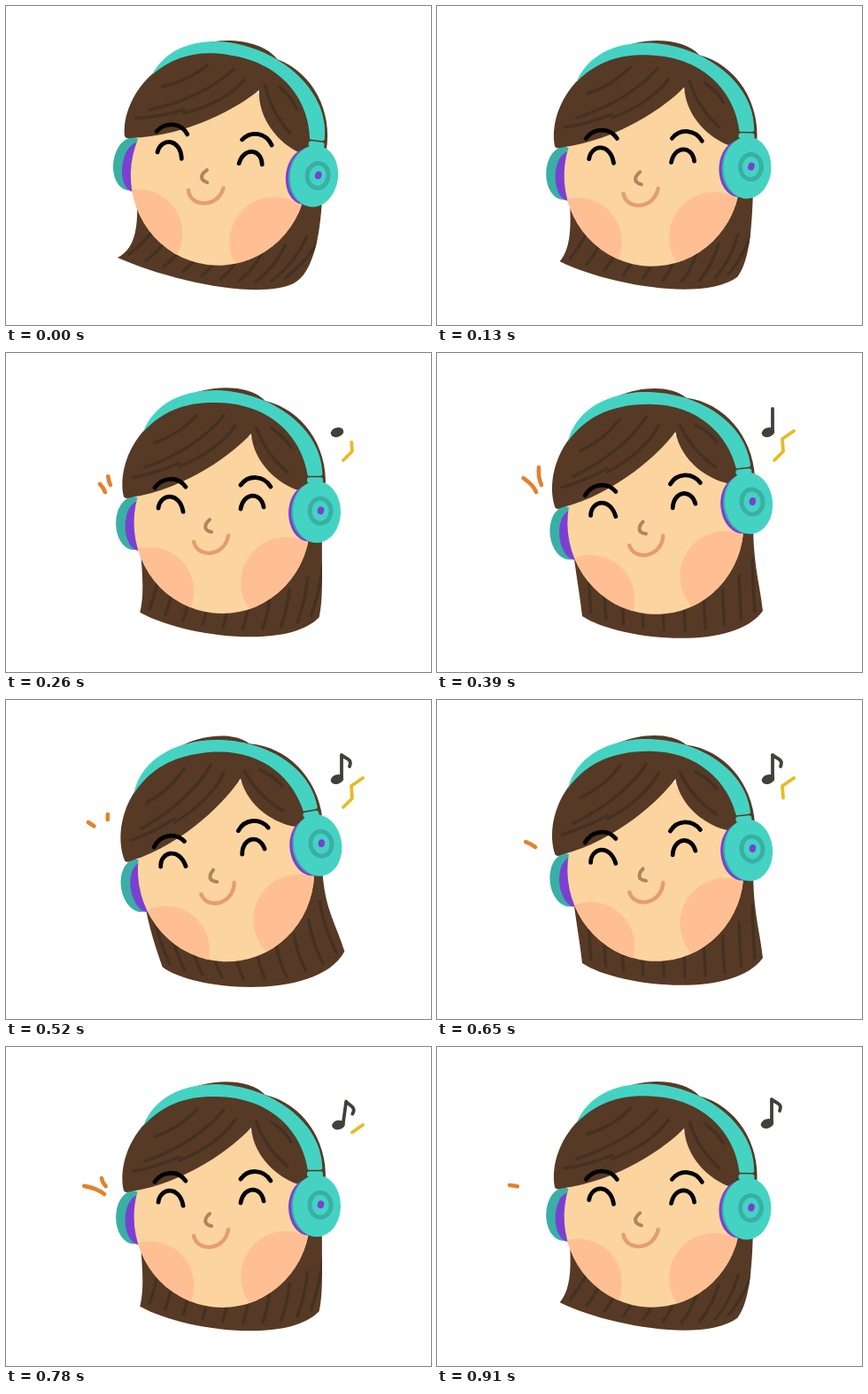
Animation of 480 by 360 pixels, one loop 1040 ms. Source, as an HTML page:

```html
<!DOCTYPE html>
<html lang="en">
<head>
<meta charset="utf-8">
<title>Listening to music</title>
<style>
  html, body { margin: 0; width: 100%; height: 100%; overflow: hidden; background: #fff; }
  svg { display: block; width: 100vw; height: 100vh; }
  .line { fill: none; stroke-linecap: round; stroke-linejoin: round; }
  .hair { fill: #563a25; }
  .strand { stroke: #433122; stroke-width: 3.5; }
  .ink { stroke: #000; stroke-width: 4.8; }
  .teal { fill: #44d3c3; }
  .deep { fill: #3aafa6; }
  .violet { fill: #7b40d2; }
  .cheek { fill: #ffbf93; }
  .spark { stroke: #e5812a; stroke-width: 4.6; }
  .zigzag { stroke: #e5bd22; stroke-width: 3.8; }
  #note { stroke: #41403a; stroke-width: 3.8; }
</style>
</head>
<body>
<svg viewBox="0 0 480 360">
  <defs>
    <clipPath id="faceClip"><ellipse cx="244" cy="191.5" rx="99.5" ry="102.5"/></clipPath>
    <clipPath id="backClip"><path class="backEdge"/></clipPath>
  </defs>

  <path class="hair backEdge"/>
  <path id="strands" class="line strand" clip-path="url(#backClip)"/>

  <g id="head">
    <ellipse class="deep" cx="144" cy="192" rx="20" ry="30"/>
    <ellipse class="violet" cx="150" cy="195" rx="15.5" ry="28"/>
    <ellipse cx="244" cy="191.5" rx="99.5" ry="102.5" fill="#fcd4a0"/>
    <g class="cheek" clip-path="url(#faceClip)">
      <circle cx="162" cy="269" r="50"/>
      <circle cx="316" cy="259" r="51"/>
    </g>

    <path class="hair" d="M133 162C128 140 135 110 157 86C175 60 200 48 220 43C245 36 278 38 293 54
      C335 64 363 105 361 150L330 155C308 148 280 125 277 91C258 112 205 153 140 163Q135 165 133 162Z"/>
    <path class="line strand" d="M168 101Q195 92 216 70M157 129Q215 108 246 71M196 128Q240 110 259 82
      M143 140Q165 137 196 124M283 84Q292 112 318 135M300 85Q315 95 322 107M309 78Q333 98 339 122"/>

    <path class="line ink" d="M168 152C176 140 194 138 203 151M265 149C274 137 291 138 299 151
      M172 175C174 158 196 156 200 179M265 176C268 157 288 156 291 174"/>
    <path class="line" stroke="#ab875c" stroke-width="4" d="M230 188Q223 194 226 199Q228 201 232 202"/>
    <path class="line" stroke="#e39d70" stroke-width="4.4" d="M212 213C216 232 247 230 251 206"/>

    <path class="teal" d="M155 89C168 56 200 42 238 42C300 44 357 85 357.500 137Q357 139 355 139H341
      C335 98 302 57 238 56C205 55 178 64 155 89Z"/>
    <rect class="teal" x="340" y="140.5" width="18" height="6.5" rx="3"/>
    <ellipse class="violet" cx="342" cy="181" rx="23" ry="32"/>
    <ellipse class="deep" cx="348" cy="180" rx="26" ry="33.5"/>
    <ellipse class="teal" cx="351" cy="179.5" rx="27" ry="35"/>
    <ellipse class="line" cx="355" cy="178.5" rx="12" ry="14" stroke="#3aafa6" stroke-width="5"/>
    <ellipse class="violet" cx="355.5" cy="178" rx="3.7" ry="4.5" transform="rotate(15 355.5 178)"/>
  </g>

  <!-- data-span: steps at which a stroke starts, is full, starts to fade, is gone -->
  <path class="line spark" data-span="1 3.5 3 4.4" d="M112 157C109 149 102 144 93 138"/>
  <path class="line spark" data-span="1 3 3 4.4" d="M118 149Q114 140 115 129"/>
  <path class="line spark" data-span="4 6.5 6 7.4" d="M111 166Q101 158 82 156"/>
  <path class="line spark" data-span="5 6 5.6 7" d="M116 160Q109 155 108 148"/>
  <path class="line zigzag" data-span="1 2.8 4 7" d="M381 121L391 111L390 97L403 88"/>
  <g id="note" class="line">
    <ellipse cx="374" cy="89.5" rx="5.5" ry="3.3" transform="rotate(-18 374 89.5)" fill="#41403a"/>
    <path data-span="2 3 8 9" d="M379 88V63"/>
    <path data-span="3 4 8 9" d="M379 62C382 66 392 66 388 75"/>
  </g>
</svg>

<script>
  const STEP = 130, STEPS = 8;
  const swing = [0, 0.42, 0.56, 1, 1.25];

  // back hair swung to either side: left side, hem, right side
  const hairLeft = [148,215, 149,245, 148,273, 126,284, 185,310, 285,332, 325,313, 346,302, 355,262, 357,216];
  const hairRight = [153,215, 156,245, 161,270, 164,297, 205,324, 335,338, 368,291, 365,262, 357,240, 357,190];

  const $ = id => document.getElementById(id);
  const all = selector => [...document.querySelectorAll(selector)];
  const mix = (a, b, t) => a + (b - a) * t;
  const ramp = (t, from, to) => Math.min(1, Math.max(0, (t - from) / (to - from)));
  const bezier = (a, b, c, d, t) => {
    const u = 1 - t;
    return u * u * u * a + 3 * u * u * t * b + 3 * u * t * t * c + t * t * t * d;
  };

  const edges = all(".backEdge");
  const strokes = all("[data-span]").map(el => {
    el.setAttribute("pathLength", 100);
    return { el, span: el.dataset.span.split(" ").map(Number) };
  });

  function drawHead(turn) {
    const k = turn - 0.55;
    $("head").setAttribute("transform", `translate(${5 * k} ${3 * k}) rotate(${-13.2 * k} 240 185)`);
  }

  function drawHair(sway) {
    const p = hairLeft.map((v, i) => mix(v, hairRight[i], sway));
    const outline = `M${p.slice(0, 2)}C${p.slice(2)}Z`;
    edges.forEach(el => el.setAttribute("d", outline));

    const lean = 0.8 - 0.85 * sway;
    let d = "";
    for (let i = 0; i < 10; i++) {
      const t = 0.07 + i * 0.095;
      const x = bezier(p[6], p[8], p[10], p[12], t);
      const y = bezier(p[7], p[9], p[11], p[13], t) - 9;
      const len = 20 + 45 * Math.abs(2 * t - 1);
      d += `M${x} ${y}q${lean * len * 0.7} ${-len * 0.45} ${lean * len} ${-len}`;
    }
    $("strands").setAttribute("d", d);
  }

  function drawStroke({ el, span: [start, full, fade, gone] }, n) {
    const head = 100 * ramp(n, start, full);
    const tail = 100 * ramp(n, fade, gone);
    el.style.display = head > tail ? "" : "none";
    el.style.strokeDasharray = `${head - tail} 300`;
    el.style.strokeDashoffset = -tail;
  }

  function drawNote(n) {
    const drift = Math.max(0, n - 5);
    const wave = Math.sin(drift * Math.PI / 2);
    $("note").style.display = n > 1 ? "" : "none";
    $("note").setAttribute("transform",
      `translate(${2 * wave - drift * 0.5} ${-1.5 * drift}) rotate(${8 * wave} 374 89)`);
  }

  function draw(n) {
    const phase = Math.min(n, STEPS - n);
    drawHead(swing[phase]);
    drawHair(phase / 3);
    strokes.forEach(s => drawStroke(s, n));
    drawNote(n);
  }

  let current = -1;
  function tick() {
    const n = Math.floor(performance.now() / STEP) % STEPS;
    if (n !== current) draw(current = n);
    requestAnimationFrame(tick);
  }
  tick();
</script>
</body>
</html>
```
